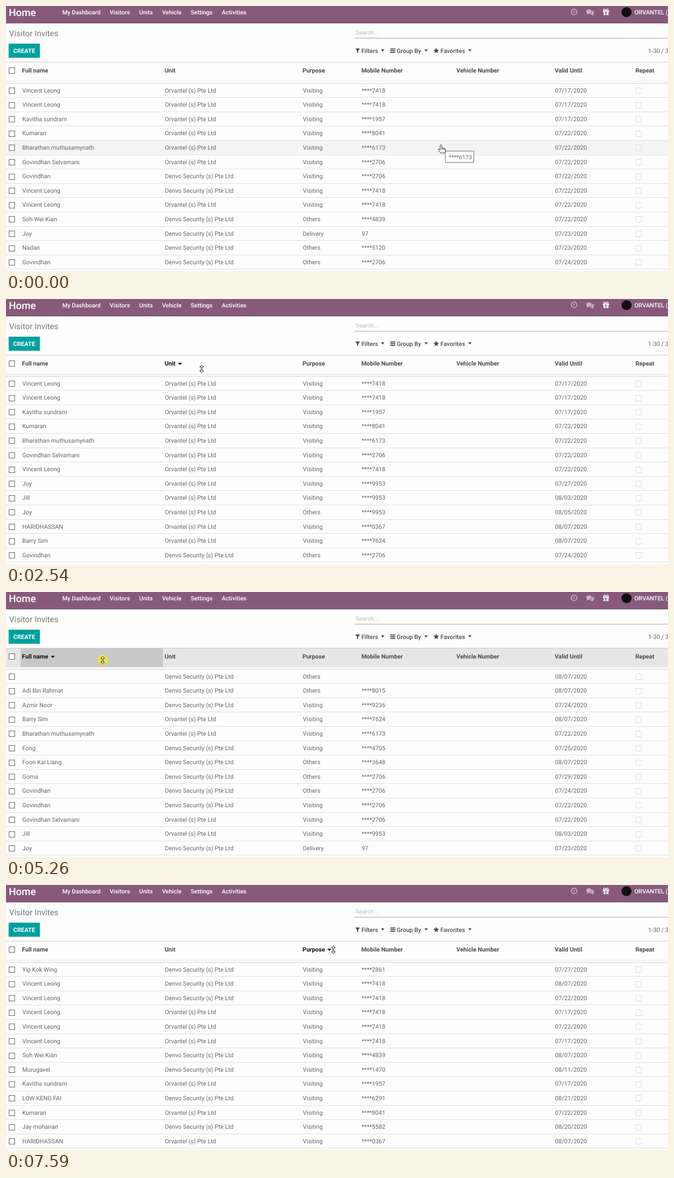
Animation, 1181 px wide and 474 px high, one loop 8 s. Source, as an HTML page:

```html
<!DOCTYPE html>
<html lang="en">
<head>
<meta charset="utf-8">
<title>Visitor Invites</title>
<style>
  html, body { margin: 0; width: 100%; height: 100%; overflow: hidden; background: #fdfdfd; }
  svg { display: block; width: 1181px; height: 474px; font: 10.66px Roboto, sans-serif; fill: #666; text-rendering: geometricPrecision; }
  .bold { font-weight: 700; fill: #4c4c4c; }
  .nav { font-weight: 500; fill: #fff; }
  #menu { font-size: 10.55px; }
  .tool { font-weight: 500; fill: #4c4c4c; }
  .box { fill: #fff; stroke: #686868; }
  .faint { fill: none; stroke: #dedede; }
  .cursor { fill: #fff; stroke: #222; stroke-width: .9; stroke-linejoin: round; }
</style>
</head>
<body>
<svg viewBox="0 0 1181 474">
  <rect width="1181" height="474" fill="#fdfdfd"/>
  <rect width="1181" height="30" fill="#875a7b"/>
  <rect y="30" width="1181" height="1" fill="#6f4a65"/>
  <text class="nav" x="5" y="18" font-size="18">Home</text>
  <g id="menu" class="nav"></g>

  <g fill="none" stroke="#c7b2c1" stroke-width="1.6">
    <circle cx="1013.5" cy="10.5" r="5"/>
    <path d="M1013.8 7.5V11h-2.6" stroke-width="1.2"/>
  </g>
  <g fill="#c7b2c1">
    <path d="M1035 10a5 3.9 0 1 1 4.6 3.8q-1.5 1.4-3.6 1.5l1-2.2q-2-1.2-2-3.1z"/>
    <path d="M1046 8q3 1.2 3 3.9q0 1.8-1.6 2.9l1 2.1q-2.5-.2-3.6-1.5q-2.6.2-4.2-.6q5.6-.6 5.4-6.8z"/>
  </g>
  <g fill="#fff">
    <path d="M1065 8.5h4.6v3h-4.6zM1071 8.5h4.8v3h-4.8zM1066 12.3h3.6v4h-3.6zM1071 12.3h3.9v4h-3.9z"/>
    <path d="M1070.3 8.5q-1.5-3.5-3.3-3q-2 1.5 0 3zq1.5-3.5 3.3-3q2 1.5 0 3z" fill="none" stroke="#fff" stroke-width="1.2"/>
  </g>
  <circle cx="1107" cy="11" r="9" fill="#111"/>
  <text class="nav" x="1121" y="15">ORVANTEL (S</text>

  <text x="5.5" y="54" font-size="14.6" fill="#777">Visitor Invites</text>
  <rect x="4.7" y="67.4" width="55.8" height="25.2" fill="#00a09d"/>
  <text x="13" y="83.5" font-weight="700" fill="#fff">CREATE</text>
  <text x="623.5" y="50.5" fill="#bcbcbc">Search...</text>
  <rect x="622" y="57" width="559" height="1" fill="#a8a8a8"/>
  <g id="tools" class="tool">
    <path d="M623 76h8.5l-3.2 4v4.5l-2.1-1.6V80z"/>
    <path d="M685.5 76h9v1.7h-9zM685.5 79h9v1.7h-9zM685.5 82h9v1.7h-9z"/>
    <path d="M767.5 74.8l1.5 3.1 3.4.5-2.5 2.4.6 3.4-3-1.6-3 1.6.6-3.4-2.5-2.4 3.4-.5z"/>
  </g>
  <text x="1145.5" y="83.5">1-30 / 3</text>

  <g id="pressed">
    <rect y="101" width="1181" height="33" fill="#e6e6e6"/>
    <rect id="cell" y="101" height="33" fill="#c8c8c8"/>
  </g>
  <rect y="100" width="1181" height="1" fill="#cdcdcd"/>
  <rect y="134" width="1181" height="1" fill="#e2e2e2"/>
  <rect id="hover" width="1181" height="25.6" fill="#f3f4f4"/>
  <rect y="137" width="1181" height="1" fill="#ededed"/>
  <rect y="138" width="1181" height="1.5" fill="#e6e6e6"/>
  <rect class="box" x="5.5" y="110.5" width="10" height="10"/>
  <g id="head"></g>
  <g id="rows"></g>
  <path id="lightCaret" fill="#bdbdbd"/>
  <path id="darkCaret" fill="#111"/>

  <g id="tip">
    <rect x="784" y="259.5" width="50.5" height="20.4" fill="#fff" stroke="#6c6c6c"/>
    <text x="790" y="273.5" font-size="10.4">****6173</text>
  </g>
  <circle id="spot" r="10" fill="#e7df55"/>
  <g id="cursor" class="cursor">
    <g id="hand">
      <path d="M-1.5 1Q0-.8 1.3 1V6Q2.6 5 3.7 6.4Q5 5.6 6 7.1Q7.6 6.6 8 8.3V11L6.5 15H-.5L-4.6 9.7Q-5 7.4-3 8L-1.5 9.5Z"/>
      <path d="M1.3 6v3M3.7 6.5v2.7M6 7.2v2.3" stroke-width=".8"/>
    </g>
    <path id="resize" d="M0-7L3.5-3.5H1V3.5H3.5L0 7L-3.5 3.5H-1V-3.5H-3.5Z"/>
    <path id="pointer" d="M0 0V12L2.8 9.5L4.6 13.8L6.4 13L4.6 8.9H8.5Z"/>
  </g>
</svg>
<script>
const LOOP = 8000, PITCH = 25.6, TOP = 138;
const $ = id => document.getElementById(id);

function add(parent, tag, attrs, text = '') {
  const el = document.createElementNS('http://www.w3.org/2000/svg', tag);
  for (const k in attrs) el.setAttribute(k, attrs[k]);
  el.textContent = text;
  parent.append(el);
  return el;
}
const show = (el, on) => { el.style.display = on ? '' : 'none'; };

// label, text x, left edge, caret x
const columns = [
  ['Full name', 28.5, 26, 83.5],
  ['Unit', 283, 280, 310.5],
  ['Purpose', 529, 526, 577],
  ['Mobile Number', 634, 631, 716],
  ['Vehicle Number', 803.5, 800, 888],
  ['Valid Until', 979, 976, 1036],
  ['Repeat', 1123, 1120, 1165]
];

const V = 'Visiting', O = 'Others', D = 'Delivery';
const A = 'Orvantel (s) Pte Ltd', F = 'Denvo Security (s) Pte Ltd';
const people = [
  ['Vincent Leong', A, V, '****7418', '07/17'],
  ['Vincent Leong', A, V, '****7418', '07/17'],
  ['Kavitha sundram', A, V, '****1957', '07/17'],
  ['Kumaran', A, V, '****8041', '07/22'],
  ['Bharathan muthusamynath', A, V, '****6173', '07/22'],
  ['Govindhan Selvamani', A, V, '****2706', '07/22'],
  ['Govindhan', F, V, '****2706', '07/22'],
  ['Vincent Leong', F, V, '****7418', '07/22'],
  ['Vincent Leong', A, V, '****7418', '07/22'],
  ['Soh Wei Kian', F, O, '****4839', '07/22'],
  ['Joy', F, D, '97', '07/23'],
  ['Nadan', F, O, '****5120', '07/23'],
  ['Govindhan', F, O, '****2706', '07/24'],
  ['Joy', A, V, '****9953', '07/27'],
  ['Jill', A, V, '****9953', '08/03'],
  ['Joy', A, O, '****9953', '08/05'],
  ['HARIDHASSAN', A, V, '****0367', '08/07'],
  ['Barry Sim', A, V, '****7624', '08/07'],
  ['', F, O, '', '08/07'],
  ['Vincent Leong', F, V, '****7418', '08/07'],
  ['Adi Bin Rahmat', F, O, '****8015', '08/07'],
  ['Foon Kai Liang', F, O, '****3648', '08/07'],
  ['Soh Wei Kian', F, V, '****4839', '08/07'],
  ['LOW KENG FAI', F, V, '****6291', '08/21'],
  ['Murugavel', F, V, '****1470', '08/11'],
  ['Jay mohanan', F, V, '****5582', '08/20'],
  ['Azmir Noor', F, V, '****9236', '07/24'],
  ['Fong', F, V, '****4705', '07/25'],
  ['Goma', F, O, '****2706', '07/29'],
  ['Yip Kok Wing', F, V, '****2861', '07/27']
];

// Each view: sorted column, direction, visible rows
const views = [
  { col: -1, up: false, rows: [0, 1, 2, 3, 4, 5, 6, 7, 8, 9, 10, 11, 12] },
  { col: 1, up: false, rows: [0, 1, 2, 3, 4, 5, 8, 13, 14, 15, 16, 17, 12] },
  { col: 1, up: true, rows: [7, 18, 9, 19, 20, 11, 21, 22, 23, 24, 25, 10, 12] },
  { col: 0, up: false, rows: [18, 20, 26, 17, 4, 27, 21, 28, 12, 6, 5, 14, 10] },
  { col: 0, up: true, rows: [29, 7, 19, 0, 8, 1, 9, 22, 11, 24, 2, 23, 3] },
  { col: 2, up: false, rows: [29, 19, 7, 0, 8, 1, 22, 24, 2, 23, 3, 25, 16] }
];

// press, highlight off, list reloaded
const clicks = [
  [2070, 2160, 2470], [3080, 3170, 3550], [4550, 4640, 4780],
  [5260, 5420, 5560], [7360, 7500, 7590]
];

// first step, last step, steps, target x, target y, bow
const moves = [
  [140, 460, 5, 740, 169, 0],
  [690, 1230, 8, 448, 146, 0],
  [1320, 1460, 3, 385, 129, 0],
  [1530, 1610, 2, 349, 125, 0],
  [4010, 4350, 5, 172.5, 122, 0],
  [5960, 6260, 5, 640, 115, -46],
  [6810, 6890, 2, 722, 132, 0],
  [6970, 7130, 3, 584, 116, 0]
];

const caret = (x, y, up, r = 3.7) =>
  up ? `M${x - r} ${y + 2}h${2 * r}l${-r} -4z` : `M${x - r} ${y - 2}h${2 * r}l${-r} 4z`;

[['My Dashboard', 100.5], ['Visitors', 185], ['Units', 237.5], ['Vehicle', 278.5],
 ['Settings', 329.5], ['Activities', 385]].forEach(([s, x]) => add($('menu'), 'text', { x, y: 15 }, s));

[['Filters', 634, 672], ['Group By', 697, 749.5], ['Favorites', 775, 827.5]].forEach(([s, x, cx]) => {
  add($('tools'), 'text', { x, y: 83.5 }, s);
  add($('tools'), 'path', { d: caret(cx, 79.5, false, 3) });
});

const heads = columns.map(([s, x]) => add($('head'), 'text', { x, y: 119, class: 'bold' }, s));

const cellX = [0, 1, 2, 3, 5].map(c => columns[c][1] + 0.5);
const cells = views[0].rows.map((_, i) => {
  const y = PITCH * i, boxY = Math.round(146 + y) + 0.5;
  add($('rows'), 'rect', { y: Math.round(163.2 + y), width: 1181, height: 1, fill: '#dfe1e4' });
  add($('rows'), 'rect', { x: 5.5, y: boxY, width: 10, height: 10, class: 'box' });
  add($('rows'), 'rect', { x: 1123.5, y: boxY, width: 10, height: 10, class: 'faint' });
  return cellX.map(x => add($('rows'), 'text', { x, y: 154.5 + y }));
});

function cursorAt(t) {
  let x = 776, y = 248;
  for (const [t0, t1, n, tx, ty, bow] of moves) {
    if (t < t0) break;
    const k = Math.min(n, 1 + Math.floor((t - t0) / (t1 - t0) * (n - 1) + 1e-6));
    const f = k / n;
    x += (tx - x) * f;
    y += (ty - y) * f + bow * Math.sin(Math.PI * f);
  }
  return [x, y];
}

let shown = null;
function showView(view) {
  if (view === shown) return;
  shown = view;
  view.rows.forEach((id, i) => people[id].forEach((s, c) => {
    cells[i][c].textContent = c === 4 ? s + '/2020' : s;
  }));
  heads.forEach((h, c) => { h.style.fill = c === view.col ? '#111' : ''; });
  show($('darkCaret'), view.col >= 0);
  if (view.col >= 0) $('darkCaret').setAttribute('d', caret(columns[view.col][3], 116, view.up));
}

function render(t) {
  const [x, y] = cursorAt(t);
  const view = views[clicks.filter(c => t >= c[2]).length];
  const click = clicks.find(c => t >= c[0] && t < c[2]);
  const inHead = y >= 101 && y < TOP;
  const col = inHead ? columns.findLastIndex(c => x >= c[2]) : -1;
  const sorted = col >= 0 && col === view.col;
  showView(view);

  show($('pressed'), click);
  if (click) {
    const left = columns[col][2];
    $('cell').setAttribute('x', left);
    $('cell').setAttribute('width', columns[col + 1][2] - left);
  }
  show($('spot'), click && t < click[1]);
  $('spot').setAttribute('transform', `translate(${x} ${y})`);

  show($('lightCaret'), col >= 0 && !sorted);
  if (col >= 0) $('lightCaret').setAttribute('d', caret(columns[col][3], 116, false));

  show($('hover'), y >= TOP);
  $('hover').setAttribute('y', TOP + PITCH * Math.floor((y - TOP) / PITCH));
  show($('tip'), t < 140);

  $('cursor').setAttribute('transform', `translate(${x} ${y})`);
  show($('resize'), sorted);
  show($('pointer'), y < 101);
  show($('hand'), !sorted && y >= 101);
}

function tick() {
  render(performance.now() % LOOP);
  requestAnimationFrame(tick);
}
tick();
</script>
</body>
</html>
```
